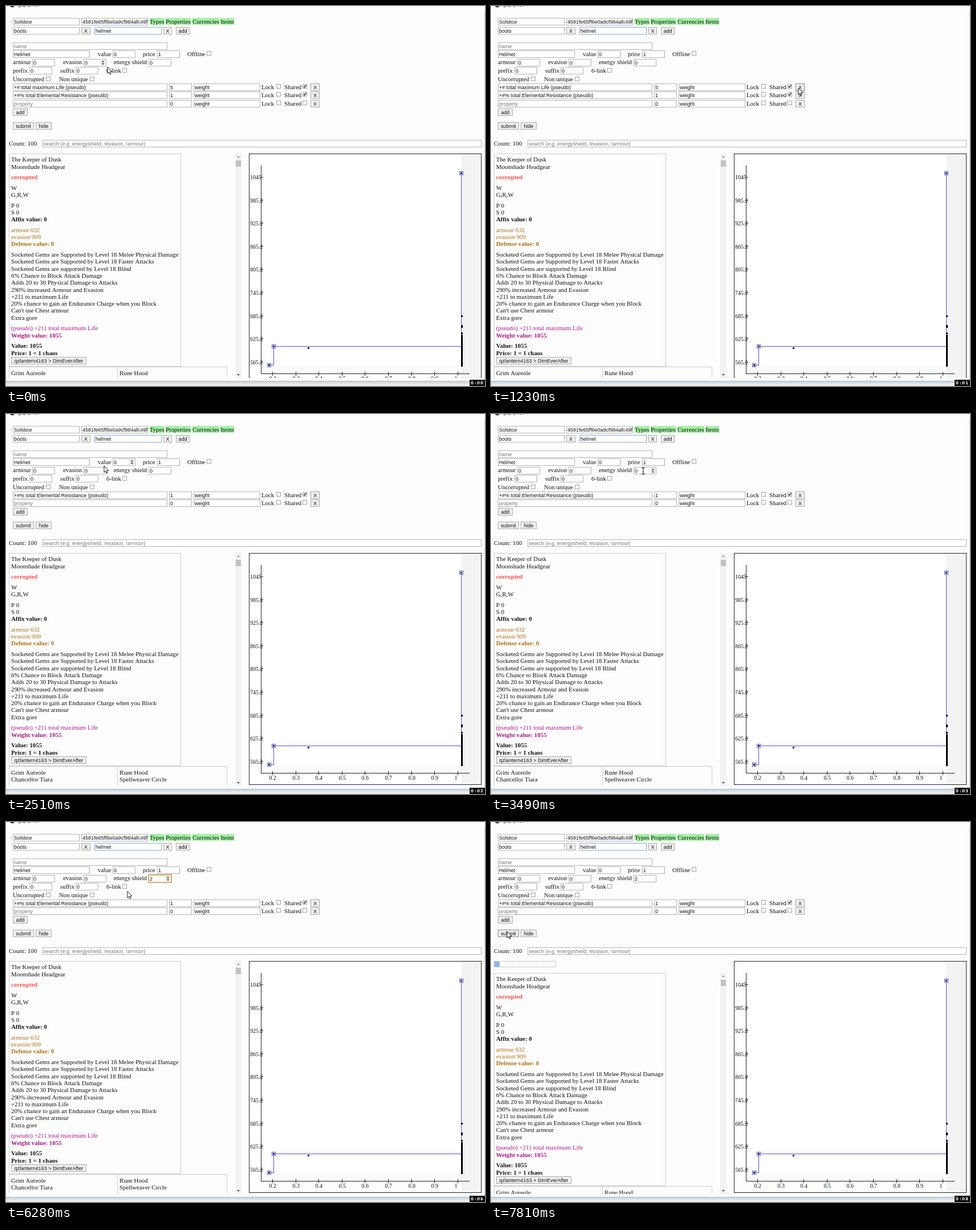
An HTML page with a canvas for the animation above (8000 ms loop, 840 px wide and 667 px high).

```html
<!DOCTYPE html>
<html>
<head>
<meta charset="utf-8">
<style>
html, body { margin: 0; width: 840px; height: 667px; overflow: hidden; background: #fdfdfd; }
canvas { display: block; }
</style>
</head>
<body>
<canvas id="stage" width="840" height="667"></canvas>
<script>
const c = document.getElementById('stage').getContext('2d');
const LOOP = 8000;
const SERIF = '"Liberation Serif", "Times New Roman", serif';
const SANS = '"Liberation Sans", Arial, sans-serif';
const INK = '#111';

// Pointer stops: time, x, y
const path = [
  [-60, 170, 99], [0, 178, 107], [640, 572, 157], [850, 539, 144], [1400, 539, 144],
  [2240, 206, 86], [2460, 206, 86], [2510, 172, 91], [2570, 172, 91],
  [2690, 144, 99], [2910, 144, 99], [3550, 270, 100], [6120, 270, 100], [6630, 28, 192], [LOOP, 28, 192]
];
const secondMarks = [940, 1930, 2960, 3880, 4900, 5880, 6810, 7810];

const item = [
  ['The Keeper of Dusk', 'Moonshade Headgear'],
  ['*corrupted'],
  ['W', 'G,R,W'],
  ['P 0', 'S 0', '*Affix value: 0'],
  ['armour 632', 'evasion 909', '*Defense value: 0'],
  ['Socketed Gems are Supported by Level 18 Melee Physical Damage',
    'Socketed Gems are Supported by Level 18 Faster Attacks',
    'Socketed Gems are supported by Level 18 Blind',
    '6% Chance to Block Attack Damage', 'Adds 20 to 30 Physical Damage to Attacks',
    '290% increased Armour and Evasion', '+211 to maximum Life',
    '20% chance to gain an Endurance Charge when you Block',
    "Can't use Chest armour", 'Extra gore'],
  ['(pseudo) +211 total maximum Life', '*Weight value: 1055'],
  ['*Value: 1055', '*Price: 1 = 1 chaos']
];
const blockColors = { 1: '#f5504e', 4: '#ad7010', 6: '#ad1484' };

let now, pointer, hovered, beam;

function pointerAt(t) {
  const i = Math.max(1, path.findIndex(p => p[0] > t));
  const [t0, x0, y0] = path[i - 1], [t1, x1, y1] = path[i];
  const u = (t - t0) / (t1 - t0), k = u * u * (3 - 2 * u);
  return [x0 + (x1 - x0) * k, y0 + (y1 - y0) * k];
}

const inside = ([px, py], x, y, w, h) => px >= x && px <= x + w && py >= y && py <= y + h;

function text(s, x, y, color = INK, font = '10.85px ' + SERIF) {
  c.font = font;
  c.fillStyle = color;
  c.fillText(s, x, y);
}
const sans = (s, x, y, color) => text(s, x, y, color, '9px ' + SANS);

function rect(x, y, w, h, fill) {
  c.fillStyle = fill;
  c.fillRect(x, y, w, h);
}

function box(x, y, w, h, stroke, fill) {
  if (fill) rect(x, y, w, h, fill);
  c.strokeStyle = stroke;
  c.lineWidth = 1;
  c.strokeRect(x + .5, y + .5, w - 1, h - 1);
}

function poly(points, stroke, fill, width = 1) {
  c.beginPath();
  points.forEach(([x, y]) => c.lineTo(x, y));
  if (fill) { c.closePath(); c.fillStyle = fill; c.fill(); }
  if (stroke) { c.strokeStyle = stroke; c.lineWidth = width; c.stroke(); }
}

function arrow(x, y, dir, color = '#555') {
  poly([[x - 2.5, y], [x + 2.5, y], [x, y + 3 * dir]], null, color);
}

function field(s, x, y, w, color = INK, border = '#b4b4b4') {
  box(x, y, w, 13, border, '#fff');
  sans(s, x + 2, y + 9.7, color);
  if (inside(pointer, x, y, w, 13)) beam = true;
}

function number(s, x, y, focused) {
  field(s, x, y, 40);
  const hover = inside(hovered, x, y, 40, 13);
  if (!hover && !focused) return;
  rect(x + 29, y + 2, 9, 9, '#eee');
  arrow(x + 34, y + 5.5, -1);
  arrow(x + 34, y + 7.5, 1);
}

function hint(s, x, y, w) { field(s, x, y, w, '#777'); }

function button(s, x, y, w) {
  const hover = inside(pointer, x, y, w, 13);
  box(x, y, w, 13, hover ? '#888' : '#aaa', '#f0f0f0');
  c.textAlign = 'center';
  sans(s, x + w / 2, y + 9.7);
  c.textAlign = 'left';
}

function check(x, y, on) {
  box(x, y, 8, 8, '#a5a5a5', '#f8f8f8');
  if (on) poly([[x + 1.8, y + 4], [x + 3.3, y + 5.8], [x + 6.5, y + 1.8]], '#333', null, 1.4);
}

function header() {
  c.beginPath();
  c.arc(11, -2, 4.5, 0, 7);
  c.fillStyle = '#444';
  c.fill();
  sans('gap-price', 21, 1, '#555');
  field('Solstice', 12, 21, 117);
  field('4581fe65ff6e0a9cf984afc49f', 132, 21, 117);
  [['Types', 252], ['Properties', 280], ['Currencies', 327], ['Items', 376]].forEach(([s, x]) => {
    c.font = '10.85px ' + SERIF;
    rect(x, 21, c.measureText(s).width, 12, '#a2f3a2');
    text(s, x, 31);
  });
  field('boots', 12, 37, 117);
  button('X', 132, 37, 16);
  box(154, 36, 120, 15, '#dfe8f8');
  field('helmet', 155, 37, 118, INK, '#a3b8e0');
  button('X', 276, 37, 15);
  button('add', 298, 37, 24);
}

function filters() {
  hint('name', 12, 64, 271);
  field('Helmet', 12, 78, 135);
  [['value', 161, 88], ['price', 240, 88], ['Offline', 318, 88], ['armour', 12, 102], ['evasion', 100, 102],
    ['energy shield', 189, 102], ['prefix', 12, 117], ['suffix', 95, 117], ['6-link', 176, 117],
    ['Uncorrupted', 12, 132], ['Non unique', 93, 132]].forEach(a => text(...a));
  [['0', 187, 78], ['1', 265, 78], ['0', 46, 93], ['0', 136, 93], ['0', 41, 107], ['0', 122, 107]]
    .forEach(a => number(...a));
  [[352, 79], [204, 109], [70, 124], [147, 124]].forEach(a => check(...a));

  const shield = now < 4710 ? '0' : now < 5440 ? '' : '2';
  const focused = now >= 3700 && now < 7150;
  number(shield, 250, 93, focused);
  if (focused) {
    c.strokeStyle = '#e6a94e';
    c.lineWidth = 1.5;
    c.strokeRect(249.75, 92.25, 40.5, 14);
    const edit = now < 4710 ? 3700 : now < 5440 ? 4740 : 5440;
    if (Math.floor((now - edit) / 510) % 2 === 0) rect(shield ? 256 : 251, 94, 1, 10, '#000');
  }
}

function properties(removed) {
  const rows = [['+# total maximum Life (pseudo)', '5'], ['+#% total Elemental Resistance (pseudo)', '1'], ['property', '0']];
  rows.slice(removed ? 1 : 0).forEach(([s, n], i) => {
    const y = Math.floor(136 + i * 14.6), empty = n === '0';
    field(s, 12, y, 271, empty ? '#777' : INK);
    number(n, 286, y);
    field('weight', 329, y, 117);
    text('Lock', 448, y + 10);
    check(474, y + 1);
    text('Shared', 488, y + 10);
    check(520, y + 1, !empty);
    button('X', 534, y, 16);
  });
}

function results() {
  const loading = now >= 7200, top = loading ? 265 : 244;
  if (loading) {
    box(5, 244, 109, 11, '#c8c8c8', '#fff');
    for (let i = 1; i < 10; i++) rect(5 + Math.round(i * 10.8), 245, 1, 9, '#ececec');
    if (now >= 7690) rect(6, 245, 9, 9, '#8ab3ee');
  }
  box(5, top, 302, 374, '#ccc');
  let y = top + 14.2;
  item.forEach((block, i) => {
    block.forEach(s => {
      const bold = s[0] === '*';
      text(bold ? s.slice(1) : s, 9, y, blockColors[i] || INK, (bold ? 'bold ' : '') + '10.85px ' + SERIF);
      y += 12.3;
    });
    y += 6.3;
  });
  button('qzlantern4163 > DimEverAfter', 9, top + 357, 132);
  [['Grim Aureole', 'Chancellor Tiara', 5], ['Rune Hood', 'Spellweaver Circle', 195]].forEach(([a, b, x]) => {
    box(x, top + 374, x === 5 ? 191 : 193, 60, '#ccc');
    text(a, x + 4, top + 388.5);
    text(b, x + 4, top + 400.8);
  });
  return top;
}

function scrollbar(top, bottom) {
  rect(402, top, 11, bottom - top, '#f2f2f2');
  rect(403, top + 12, 9, 11, '#c2c2c2');
  arrow(407.5, top + 7, -1, '#999');
  arrow(407.5, bottom - 7, 1);
}

function marker(x, y) {
  box(x - 3, y - 3, 7, 7, '#5050e4', '#fff');
  rect(x - 1, y - 1, 3, 3, '#000');
}

function chart() {
  rect(427, 245, 407, 407, '#fff');
  rect(447, 617, 366, 14, '#fafafa');
  rect(799, 245, 34, 406, '#f3f3f3');
  box(426, 244, 408, 407, '#222');
  const small = '10px ' + SERIF;
  for (let i = 0; i < 9; i++) {
    const x = Math.round(467 + i * 40.6), y = Math.round(285 + i * 40.6);
    text(i ? `${1045 - i * 60}.2` : '1045', 428, y + 3.7, INK, small);
    rect(445, y, 6, 1, '#333');
    rect(x, 627, 1, 7, '#222');
    text(String((i + 2) / 10), x - 5.5, 642, INK, small);
  }
  rect(447, 265, 1, 366, '#222');
  rect(447, 630, 366, 1, '#222');
  poly([[461, 615.5], [469.5, 615.5], [469.5, 582.5], [798.5, 582.5], [798.5, 279]], '#5050e4');
  [[529, 584], [798, 528], [798, 545], [798, 547], [798, 558]].forEach(([x, y]) => rect(x, y, 3, 3, '#000'));
  rect(798, 562, 3, 56, '#000');
  marker(461, 615);
  marker(469, 582);
  marker(798, 278);
}

function drawPointer() {
  const [x, y] = pointer;
  c.save();
  c.translate(x, y);
  if (beam) {
    rect(-.5, -5, 1, 10, '#000');
    rect(-2.5, -6, 5, 1, '#000');
    rect(-2.5, 5, 5, 1, '#000');
  } else {
    poly([[0, 0], [0, 11.5], [2.6, 9.1], [4.3, 13], [6, 12.3], [4.4, 8.5], [8, 8.3], [0, 0]], '#000', '#fff', .9);
  }
  c.restore();
}

function windowEdge(active) {
  const shade = c.createLinearGradient(0, 658, 0, 667);
  shade.addColorStop(0, '#cfcfcf');
  shade.addColorStop(1, '#f3f3f3');
  rect(0, 658, 840, 9, shade);
  rect(0, 658, 840, 1, active ? '#86c2f2' : '#b5b5b5');
  rect(839, 9, 1, 649, '#d2d2d2');
}

function timer() {
  const n = secondMarks.filter(m => now >= m).length;
  rect(813, 656, 27, 11, '#000');
  [['0', 815], [':', 822], ['0', 826], [n, 832]].forEach(([s, x]) =>
    text(s, x, 664.3, '#fff', 'bold 7px "DejaVu Sans", sans-serif'));
}

function draw(ms) {
  now = ms % LOOP;
  pointer = pointerAt(now);
  hovered = pointerAt(now - 60); // spinners trail the pointer a little
  beam = false;
  // Pressing the button activates the window, releasing it removes the row
  const active = now >= 1200, removed = now >= 1320;

  rect(0, 0, 840, 667, '#fdfdfd');
  c.save();
  c.beginPath();
  c.rect(0, 0, 840, 653);
  c.clip();
  header();
  filters();
  properties(removed);
  c.translate(0, removed ? 0 : 15);
  button('add', 12, 165, 26);
  button('submit', 12, 189, 37);
  button('hide', 52, 189, 28);
  text('Count: 100', 5, 230, INK, '11px ' + SERIF);
  hint('search (e.g. energyshield, !evasion, !armour)', 64, 220, 770);
  const top = results();
  scrollbar(top, removed ? 653 : 638);
  chart();
  c.restore();

  windowEdge(active);
  drawPointer();
  timer();
}

function tick() {
  draw(performance.now());
  requestAnimationFrame(tick);
}
tick();
</script>
</body>
</html>
```
